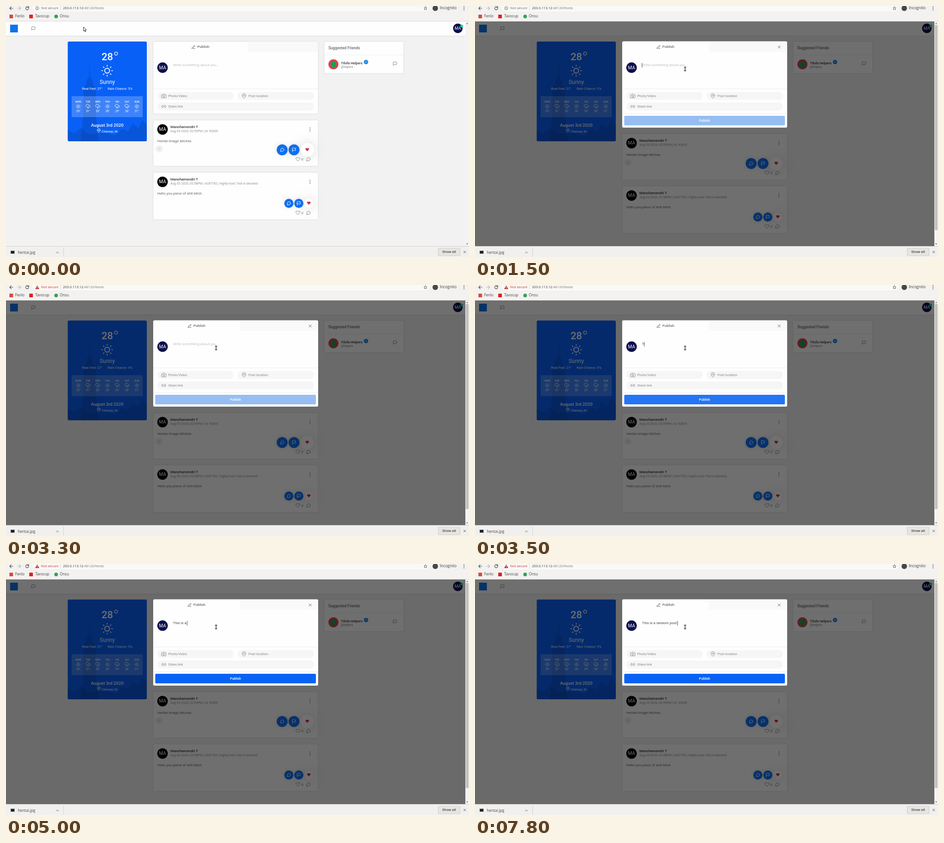
Write an HTML page with a canvas that moves like this. It is 1016 px wide and 551 px high and loops after 8000 ms.

```html
<!DOCTYPE html>
<html lang="en">
<head>
<meta charset="utf-8">
<title>Publishing a post</title>
<style>
  html, body { margin: 0; width: 100%; height: 100%; overflow: hidden; }
  canvas { display: block; }
</style>
</head>
<body>
<canvas id="stage" width="1016" height="551"></canvas>
<script>
const ctx = document.getElementById('stage').getContext('2d');
const LOOP = 8000, OPEN = 1500, TYPE = 3400;
const UI = '"Open Sans", "Noto Sans", sans-serif';
const BLUE = '#0863f5', GREY = '#85888f', NAVY = '#0b0f4c';

// Stroke icons on a 24 unit grid
const ICONS = {
  back: 'M21 12H4M12 20l-8-8 8-8',
  forward: 'M3 12h17M12 4l8 8-8 8',
  reload: 'M20 13a8 8 0 1 1-2.3-6.7L20 8.5M20 3v5.5h-5.5',
  star: 'M12 2l3.1 6.3 6.9 1-5 4.9 1.2 6.8-6.2-3.2-6.2 3.2 1.2-6.8-5-4.9 6.9-1z',
  square: 'M21 15a2 2 0 0 1-2 2H7l-4 4V5a2 2 0 0 1 2-2h14a2 2 0 0 1 2 2z',
  bubble: 'M21 11.5a8.4 8.4 0 0 1-12.3 7.6L3 21l1.9-5.7A8.4 8.4 0 1 1 21 11.5z',
  flag: 'M4 15s1-1 4-1 5 2 8 2 4-1 4-1V3s-1 1-4 1-5-2-8-2-4 1-4 1zM4 22v-7',
  heart: 'M20.8 4.6a5.5 5.5 0 0 0-7.8 0L12 5.7l-1-1.1a5.5 5.5 0 0 0-7.8 7.8L12 21.2l8.8-8.8a5.5 5.5 0 0 0 0-7.8z',
  pin: 'M21 10c0 7-9 13-9 13s-9-6-9-13a9 9 0 0 1 18 0zM15 10a3 3 0 1 1-6 0a3 3 0 1 1 6 0',
  camera: 'M23 19a2 2 0 0 1-2 2H3a2 2 0 0 1-2-2V8a2 2 0 0 1 2-2h4l2-3h6l2 3h4a2 2 0 0 1 2 2zM16 13a4 4 0 1 1-8 0a4 4 0 1 1 8 0',
  link: 'M9 17H7A5 5 0 0 1 7 7h2M15 7h2a5 5 0 0 1 0 10h-2M8 12h8',
  pen: 'M17 3a2.8 2.8 0 1 1 4 4L7.5 20.5 2 22l1.5-5.5zM13 22h8',
  sun: 'M17 12a5 5 0 1 1-10 0a5 5 0 1 1 10 0M12 1v2M12 21v2M4.2 4.2l1.4 1.4M18.4 18.4l1.4 1.4M1 12h2M21 12h2M4.2 19.8l1.4-1.4M18.4 5.6l1.4-1.4',
  storm: 'M19 16.9A5 5 0 0 0 18 7h-1.3a8 8 0 1 0-11.7 9M13 11l-4 6h6l-4 6',
  rain: 'M16 13v6M8 13v6M12 15v6M20 16.6A5 5 0 0 0 18 7h-1.3A8 8 0 1 0 4 15.3',
  close: 'M19 5L5 19M5 5l14 14',
  up: 'M6 15l6-6 6 6',
  tick: 'M5 12l5 5 9-10'
};
for (const name in ICONS) ICONS[name] = new Path2D(ICONS[name]);

function text(str, x, y, size, color, { weight = 400, align = 'left', font = 'Roboto, sans-serif' } = {}) {
  ctx.font = `${weight} ${size}px ${font}`;
  ctx.textAlign = align;
  ctx.textBaseline = 'middle';
  ctx.fillStyle = color;
  ctx.fillText(str, x, y);
  return ctx.measureText(str).width;
}

function box(x, y, w, h, color, radius = 0) {
  ctx.beginPath();
  ctx.roundRect(x, y, w, h, radius);
  ctx.fillStyle = color;
  ctx.fill();
}

function disc(x, y, r, color) {
  ctx.beginPath();
  ctx.arc(x, y, r, 0, 7);
  ctx.fillStyle = color;
  ctx.fill();
}

function shape(points, color) {
  ctx.beginPath();
  points.forEach(p => ctx.lineTo(...p));
  ctx.fillStyle = color;
  ctx.fill();
}

function icon(name, x, y, size, color, { line = 1, fill = false } = {}) {
  const k = size / 24;
  ctx.save();
  ctx.translate(x - size / 2, y - size / 2);
  ctx.scale(k, k);
  ctx.lineWidth = line / k;
  ctx.lineCap = ctx.lineJoin = 'round';
  ctx.strokeStyle = ctx.fillStyle = color;
  fill ? ctx.fill(ICONS[name]) : ctx.stroke(ICONS[name]);
  ctx.restore();
}

function shadow(blur, color, draw) {
  ctx.save();
  ctx.shadowBlur = blur;
  ctx.shadowColor = color;
  draw();
  ctx.restore();
}

function card(x, y, w, h) {
  shadow(3, 'rgba(0,0,0,.13)', () => box(x, y, w, h, '#fefefe', 2));
}

function dots(x, y, gap, color) {
  for (const i of [-1, 0, 1]) disc(x, y + i * gap, 1, color);
}

function avatar(x, y, r, color) {
  disc(x, y, r, color);
  text('MA', x, y + .5, r * .87, '#fff', { align: 'center' });
}

function browser(t) {
  const ui = { font: UI };
  box(0, 0, 1016, 33, '#f3f2f0');
  box(57, -12, 874, 24, '#f9f9f8', 12);
  icon('back', 11.5, 5, 10, '#4a4a4a', { line: 1.2 });
  icon('forward', 29, 5, 10, '#b5b5b3', { line: 1.2 });
  icon('reload', 46.5, 5, 10, '#4a4a4a', { line: 1.2 });
  const alarm = t >= 3300;
  if (alarm) {
    shape([[68.5, 1], [73, 9], [64, 9]], '#c5302b');
    box(68, 3.8, 1, 2.6, '#fff');
    box(68, 7, 1, 1, '#fff');
  } else {
    ctx.beginPath();
    ctx.arc(68.5, 5, 3.5, 0, 7);
    ctx.lineWidth = .9;
    ctx.strokeStyle = '#666';
    ctx.stroke();
    box(68, 4.5, 1, 2.5, '#666');
    box(68, 2.8, 1, 1, '#666');
  }
  text('Not secure', 77, 5, 7.5, alarm ? '#c5302b' : '#666', ui);
  box(119, 0, 1, 10, '#d4d4d2');
  const host = text('203.0.113.12', 125, 5, 7.5, '#333', ui);
  text(':48120/feeds', 125 + host, 5, 7.5, '#777', ui);
  icon('star', 920.5, 5, 8.5, '#555', { line: .9 });
  disc(942, 5, 6, '#46474b');
  text('Incognito', 952, 5, 8.5, '#3c3c3c', ui);
  dots(1005, 5, 3.5, '#555');

  box(7.5, 19, 8, 8, '#d64a3c');
  box(51, 19, 8, 8, '#e02020');
  disc(110, 23, 4, '#34a05a');
  [['Fenlo', 20], ['Tavocup', 64], ['Onsu', 118]]
    .forEach(([label, x]) => text(label, x, 23, 8.1, '#444', ui));
  box(0, 33, 1016, 1, '#dcdbd9');

  box(0, 527, 1016, 24, '#f1f0ee');
  box(0, 527, 1016, 1, '#cfcecc');
  box(10, 537, 9, 7, '#77797c');
  box(11, 538, 7, 5, '#1d1f22');
  text('hentai.jpg', 26, 541.5, 8.3, '#444', ui);
  icon('up', 113, 541, 10, '#555');
  box(126, 530, 1, 20, '#d0cfcd');
  box(948, 531.5, 49, 17, '#c9c8c5', 2);
  box(948.8, 532.3, 47.4, 15.4, '#e6e5e2', 2);
  text('Show all', 972.3, 540, 7.6, '#3c3c3c', { weight: 600, align: 'center', font: UI });
  icon('close', 1006.5, 540, 7.5, '#555');
}

function scrollbar(open) {
  box(1008, 34, 8, 493, '#f3f3f2');
  if (open) box(1009, 42, 6, 450, '#c2c1bf');
  shape([[1010, 39.5], [1012, 36.5], [1014, 39.5]], '#777');
  shape([[1010, 521], [1012, 524], [1014, 521]], '#777');
}

function header() {
  shadow(3, 'rgba(0,0,0,.15)', () => box(0, 34, 1008, 31, '#fefefe'));
  box(9, 41, 17, 17, '#1273ea');
  icon('square', 60, 49.5, 10, GREY);
  avatar(991.5, 49, 10.5, NAVY);
  disc(1000, 44, 3, '#06df8d');
}

function weather() {
  const white = { align: 'center' }, bold = { align: 'center', weight: 500 };
  ctx.save();
  ctx.beginPath();
  ctx.roundRect(135.5, 78, 173.5, 219, 3);
  ctx.clip();
  box(135, 78, 175, 220, '#0860f7');
  const dusk = 'rgba(10,60,140,.28)';
  shape([[183.5, 122], [185, 155], [190, 162], [191, 172], [197, 180], [198, 245], [203, 297],
    [164, 297], [169, 245], [170, 180], [176, 172], [177, 162], [182, 155]], dusk);
  shape([[135, 272], [150, 280], [165, 268], [180, 282], [215, 278], [240, 284], [255, 270], [268, 276],
    [278, 258], [290, 268], [300, 250], [310, 262], [310, 298], [135, 298]], dusk);
  ctx.restore();

  text('28', 222.3, 112.5, 22.2, '#fff', bold);
  ctx.beginPath();
  ctx.arc(241.5, 104.5, 3.4, 0, 7);
  ctx.lineWidth = 1.3;
  ctx.strokeStyle = '#fff';
  ctx.stroke();
  icon('sun', 222, 142, 26, '#fff', { line: 1.7 });
  text('Sunny', 222.3, 167.5, 12.3, '#fff', white);
  text('Real Feel: 27°', 167, 182, 7.41, '#fff');
  text('Rain Chance: 5%', 223, 182, 7.41, '#fff');

  box(144, 198, 156, 46, 'rgba(255,255,255,.22)');
  const days = 'MON,29,sun TUE,31,storm WED,33,storm THU,28,sun FRI,29,rain SAT,28,rain SUN,31,sun';
  days.split(' ').forEach((day, i) => {
    const [label, degrees, sky] = day.split(','), x = 158.6 + i * 21.4;
    text(label, x, 210, 5.4, '#fff', bold);
    icon(sky, x, 220.5, 10.5, '#fff', { line: .9 });
    text(degrees + '°', x + .3, 231, 6.35, '#fff', white);
  });
  text('August 3rd 2020', 222.2, 262.5, 9.6, '#fff', bold);
  icon('pin', 203.5, 273.5, 9, '#fff', { line: .9 });
  text('Chennai, IN', 210, 275.5, 6.9, '#fff');
}

function friends() {
  card(698.5, 78.5, 173.5, 69);
  text('Suggested Friends', 707.5, 92.7, 8.3, '#666a70', { weight: 500 });
  box(699, 107, 173, 1, '#eee');
  disc(718.5, 128, 11, '#d8454c');
  ctx.beginPath();
  ctx.ellipse(718.5, 128.5, 6, 7.5, 0, 0, 7);
  ctx.fillStyle = '#259a55';
  ctx.fill();
  text('Tilofa Helpers', 735, 126, 7.5, '#333', { weight: 500 });
  disc(790, 123, 4.8, '#1b86e6');
  icon('tick', 790, 123, 5.5, '#fff');
  text('@helpers', 735, 134, 6.35, '#808080');
  icon('square', 853.5, 126.5, 10, GREY);
}

function post(y, h, meta, body, r, gap, heartR) {
  card(323.5, y, 361, h);
  avatar(343.5, y + 20, 11.5, '#000');
  text('Manohamendri T', 360.7, y + 14.7, 7.94, '#333', { weight: 500 });
  text(meta, 360.7, y + 24.2, 7, '#909090');
  dots(667, y + 20, 3.5, '#777');
  text(body, 332, y + 46, 7.94, '#666');
  const cy = y + h - 35.3, heartX = heartR > r ? 661 : 664.5, flagX = heartR > r ? 632 : 642.5;
  const halo = 'rgba(0,0,0,.14)';
  shadow(22, halo, () => disc(heartX, cy, heartR, '#fff'));
  [['bubble', flagX - gap], ['flag', flagX]].forEach(([name, x]) => {
    shadow(8, halo, () => disc(x, cy, r, '#0f6ff0'));
    icon(name, x, cy, 10, '#fff');
  });
  icon('heart', heartX, cy - .5, 9, '#e0263c', { fill: true });
  icon('heart', 640.5, y + h - 14.5, 10.5, GREY);
  text('0', 650.3, y + h - 14.3, 7.94, '#777', { align: 'center' });
  icon('bubble', 663.5, y + h - 14.5, 10.5, GREY);
}

function posts(y) {
  post(251 + y, 100, 'Aug 03 2020, 02:59PM | Id: 92839', 'Hentai Image bitches', 12, 26, 15);
  const glow = ctx.createRadialGradient(336, 313.5 + y, 0, 336, 313.5 + y, 10);
  glow.addColorStop(0, 'rgba(120,120,120,.22)');
  glow.addColorStop(1, 'rgba(120,120,120,0)');
  disc(336, 313.5 + y, 10, glow);
  post(366 + y, 102.5, 'Aug 03 2020, 02:58PM | Id:87782 | highly toxic Text is blocked',
    'Hello you piece of shit bitch', 10, 21.8, 10);
}

// Each key press: [time, character]
const KEYS = [3400, 3600, 3700, 4000, 4100, 4400, 4500, 4600, 4800, 5000, 5600, 5800,
  6000, 6200, 6300, 6400, 6700, 6900, 7100, 7200, 7400, 7800]
  .map((time, i) => [time, 'This is a random post.'[i]]);

function buttonColor(t) {
  const left = Math.min(1, Math.max(0, 1 - (t - TYPE) / 300)) ** 4;
  const mix = (from, to) => Math.round(to + (from - to) * left);
  return `rgb(${mix(150, 8)},${mix(190, 99)},${mix(243, 245)})`;
}

function composer(t, open) {
  const tab = open ? 513 : 530, labelX = open ? 411 : 419.7;
  if (open) box(323, 77.5, 362, 189.5, '#fefefe', 3);
  else card(323.5, 78.5, 361, 157.5);
  box(tab, 78.5, 684.5 - tab, open ? 22 : 23, '#f9f9f9', [0, 3, 0, 0]);
  icon('pen', labelX - 8.3, 90, 8.5, '#666');
  text('Publish', labelX, 90, 7.94, '#6b6e73', { weight: 500 });
  avatar(343.5, 135.3, 11.5, NAVY);

  const typed = KEYS.filter(([time]) => t >= time).map(key => key[1]).join('');
  let width = 0;
  if (typed) width = text(typed, 366.5, 130, 7.94, '#444');
  else text('Write something about you...', 366.5, 130, 7.94, '#c0c0c0');
  const blinkedOff = (t >= 2500 && t < 2700) || (t >= 3300 && t < TYPE);
  if (open && !blinkedOff) box(Math.floor(366.5 + width), 125, 1, 10, '#555');

  box(323.5, 181.5, 361, 1, '#ececec');
  [['camera', 'Photo/Video', 332, 197.5, 167.5], ['pin', 'Post location', 508, 197.5, 168],
    ['link', 'Share link', 332, 220.5, 344]].forEach(([name, label, x, y, w]) => {
    box(x, y - 8.8, w, 17.6, '#f6f6f6', 8.8);
    icon(name, x + 14.2, y, 11, GREY);
    text(label, x + 24, y + .3, 7.41, '#85888c');
  });

  if (open) {
    icon('close', 667.5, 90, 9, '#666');
    box(323.5, 236, 361, 1, '#ececec');
    box(327.5, 241, 352.5, 21, buttonColor(t), 2);
    text('Publish', 503.7, 251.7, 7.3, '#fff', { weight: 500, align: 'center' });
  }
}

function pointer(t) {
  const step = Math.min(9, Math.max(0, t / 100 - 4)) / 9;
  const u = Math.sin(step * Math.PI / 2), v = 1 - u;
  const curve = (a, b, c, d) => a * v ** 3 + 3 * b * u * v * v + 3 * c * u * u * v + d * u ** 3;
  const x = curve(170, 260, 560, 461), y = curve(46, 250, 385, 138);
  const overField = x > 362 && x < 680 && y > 118 && y < 178;
  ctx.save();
  ctx.translate(x, y);
  if (overField) {
    box(-.7, -4, 1.4, 8.5, '#222');
    box(-2.5, -4.5, 5, 1.2, '#222');
    box(-2.5, 3.8, 5, 1.2, '#222');
  } else {
    const arrow = new Path2D('M0 0v9l2-1.8 1.6 3.5 1.6-.7-1.6-3.4h2.8z');
    ctx.lineWidth = 1;
    ctx.strokeStyle = '#222';
    ctx.fillStyle = '#fff';
    ctx.fill(arrow);
    ctx.stroke(arrow);
  }
  ctx.restore();
}

function draw(now) {
  const t = Math.floor(now % LOOP / 100) * 100, open = t >= OPEN;
  box(0, 0, 1016, 551, '#f2f2f2');
  header();
  weather();
  friends();
  posts(open ? 30 : 0);
  if (open) box(0, 33, 1008, 494, 'rgba(0,0,0,.56)');
  composer(t, open);
  scrollbar(open);
  browser(t);
  pointer(t);
}

const start = performance.now();
function tick() {
  draw(performance.now() - start);
  requestAnimationFrame(tick);
}
tick();
</script>
</body>
</html>
```
